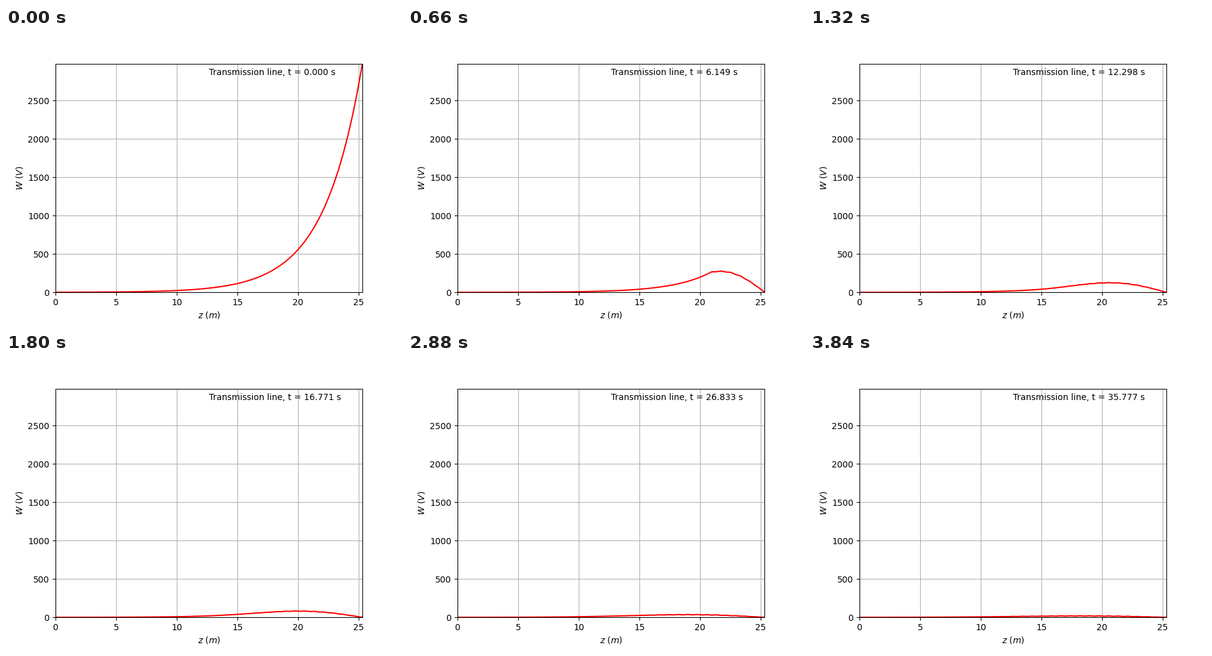
Write a matplotlib script that moves like this. It is 640 px wide and 480 px high and loops after 3.9 s.

```python
import numpy as np
import matplotlib.pyplot as plt
from matplotlib.animation import FuncAnimation

# Telegraph equation: LC w_tt + (RC + GL) w_t + RG w = w_zz
LC, RC_GL, RG = 2.0, 2.1, 0.1
CELLS, STEPS = 64, 64

kappa = np.sqrt(RG)
length = 8 / kappa
z = np.linspace(0, length, CELLS + 1)
dt = (z[1] - z[0]) * np.sqrt(LC)
gamma = RC_GL / LC


def solve():
    """Leapfrog solution with unit Courant number, one row per time step."""
    s = gamma * dt / 2
    q = RG / LC * dt**2
    w = np.zeros((STEPS + 1, CELLS + 1))
    w[0] = np.exp(kappa * z)
    w[1] = (1 - s) * w[0]
    for n in range(1, STEPS + 1):
        if n > 1:
            a, b = w[n - 1], w[n - 2]
            w[n, 1:-1] = (a[2:] + a[:-2] - q * a[1:-1]
                          - (1 - s) * b[1:-1]) / (1 + s)
        w[n, [0, -1]] = w[0, [0, -1]] * np.exp(-gamma * n * dt)
    return w


w = solve()

fig, ax = plt.subplots(figsize=(6.4, 4.8), dpi=100)
ax.set_xlim(0, length)
ax.set_ylim(0, w[0, -1])
ax.set_xlabel(r"$z\ (m)$")
ax.set_ylabel(r"$W\ (V)$")
ax.grid(True)
line, = ax.plot(z, w[0], color="red", lw=1.5)
label = ax.text(0.5, 0.95, "", transform=ax.transAxes)


def update(n):
    line.set_ydata(w[n])
    label.set_text(f"Transmission line, t = {n * dt:.3f} s")
    return line, label


anim = FuncAnimation(fig, update, frames=STEPS + 1, interval=60,
                     repeat=True, repeat_delay=0, blit=False)
plt.show()
```
